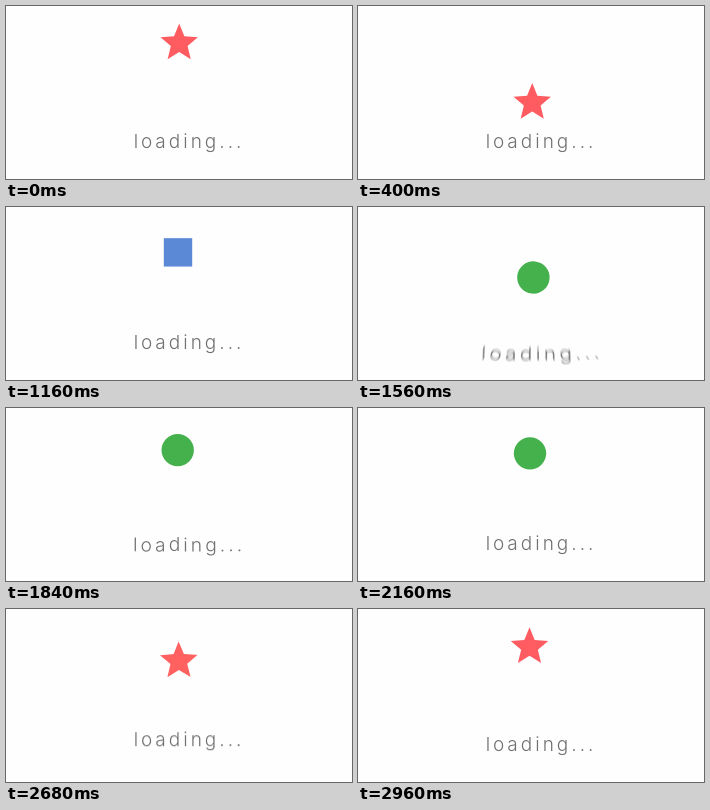
Write an HTML page with a canvas that moves like this. It is 346x173 px and loops after 3 s.

```html
<!DOCTYPE html>
<html lang="en">
<head>
<meta charset="utf-8">
<title>Loading</title>
<style>
  html, body { margin: 0; width: 100%; height: 100%; overflow: hidden; background: #fefefe; }
  canvas { display: block; width: 346px; height: 173px; }
</style>
</head>
<body>
<canvas id="stage" role="img" aria-label="loading..."></canvas>
<script>
const W = 346, H = 173, LOOP = 3000, BOUNCE = 1000, HIT = 440, SETTLED = 720;
const STEP = 40, SHUTTER = 24, SAMPLES = 16;
const canvas = document.getElementById('stage');
const ctx = canvas.getContext('2d');
const dpr = window.devicePixelRatio || 1;
canvas.width = W * dpr;
canvas.height = H * dpr;

// Monotone cubic curve through [time, value] points; level at peaks and ends.
function curve(points) {
  const slope = i => (points[i + 1][1] - points[i][1]) / (points[i + 1][0] - points[i][0]);
  const tangents = points.map((_, i) => {
    if (i === 0 || i === points.length - 1) return 0;
    const a = slope(i - 1), b = slope(i);
    return a * b <= 0 ? 0 : 2 * a * b / (a + b);
  });
  return t => {
    let i = 0;
    while (i < points.length - 2 && t >= points[i + 1][0]) i++;
    const [t0, v0] = points[i], [t1, v1] = points[i + 1];
    const d = t1 - t0, u = Math.min(1, Math.max(0, (t - t0) / d)), r = 1 - u;
    return v0 * (1 + 2 * u) * r * r + tangents[i] * d * u * r * r
         + v1 * u * u * (3 - 2 * u) - tangents[i + 1] * d * u * u * r;
  };
}

const TOP = 37.3, FLOOR = 110.5;
const rise = curve([[400, 124], [HIT, FLOOR], [480, 96.7], [560, 70.5], [720, 48.7], [960, 38], [1000, TOP]]);
const drift = curve([[0, 173.2], [160, 172], [480, 175], [560, 175.4], [720, 172.2], [960, 171.5], [1000, 173.2]]);
const sink = curve([[0, 0], [HIT, 0], [480, 25], [560, 13], [680, -5], [720, -3.5], [840, 1.5], [960, -0.5], [1000, 0]]);
const height = t => t < HIT ? TOP + (FLOOR - TOP) * (t / HIT) ** 2.18 : rise(t);

function spin(t) {
  if (t < HIT || t >= SETTLED) return 0;
  return -2.5 * Math.PI * (1 - (t - HIT) / (SETTLED - HIT)) ** 3;
}

function starPath() {
  for (let i = 0; i < 10; i++) {
    const r = i % 2 ? 8.8 : 19.7, a = i * Math.PI / 5;
    ctx.lineTo(r * Math.sin(a), -r * Math.cos(a));
  }
}

const shapes = [
  { color: '#ff5c62', path: starPath },
  { color: '#5c89d5', path: () => ctx.rect(-14.2, -14.2, 28.4, 28.4) },
  { color: '#45b14d', path: () => ctx.arc(0, 0, 16.2, 0, 2 * Math.PI), round: true }
];

function drawShape(shape, t, angle) {
  ctx.save();
  ctx.translate(drift(t), height(t));
  ctx.rotate(angle);
  ctx.beginPath();
  shape.path();
  ctx.fillStyle = shape.color;
  ctx.fill();
  ctx.restore();
}

const LETTERS = [...'loading...'];
const FONT = '300 19px Inter, "Helvetica Neue", "Liberation Sans", sans-serif';
const SPACING = 3, MIDDLE = 181.5, BASELINE = 142, DENT = -10, HALF = 54, BEND = 0.13;

// Pushed down, the word sags around the dent, widens and flattens.
function drawText(t) {
  const d = sink(t), push = Math.max(0, d), spread = 1 + 0.0092 * push;
  ctx.font = FONT;
  ctx.textAlign = 'center';
  ctx.fillStyle = '#707070';
  const widths = LETTERS.map(c => ctx.measureText(c).width);
  const total = widths.reduce((a, b) => a + b + SPACING, -SPACING);
  let x = -total / 2;
  LETTERS.forEach((c, i) => {
    const mid = x + widths[i] / 2, u = (mid - DENT) / HALF;
    ctx.save();
    ctx.translate(MIDDLE + push * 0.08 + mid * spread, BASELINE + d - push * BEND * u * u);
    ctx.rotate(-2 * push * BEND * u / (HALF * spread));
    ctx.scale(spread, 1 - 0.006 * push);
    ctx.fillText(c, 0, 0);
    ctx.restore();
    x += widths[i] + SPACING;
  });
}

// Averages several moments while the shutter is open.
function blurred(moving, t, draw) {
  const n = moving ? SAMPLES : 1;
  ctx.globalAlpha = 1 / n;
  for (let i = 0; i < n; i++) draw(t + SHUTTER * i / n);
}

function render(now) {
  const time = Math.floor((now + 5) / STEP) * STEP % LOOP;
  const t = time % BOUNCE;
  const shape = shapes[Math.floor((time + BOUNCE - HIT) / BOUNCE) % 3];
  const moving = t >= HIT && t < SETTLED;
  ctx.setTransform(dpr, 0, 0, dpr, 0, 0);
  ctx.globalCompositeOperation = 'source-over';
  ctx.clearRect(0, 0, W, H);
  ctx.globalCompositeOperation = 'lighter';
  blurred(moving && !shape.round, t, s => drawShape(shape, t, spin(s)));
  blurred(moving, t, drawText);
  requestAnimationFrame(render);
}
requestAnimationFrame(render);
</script>
</body>
</html>
```
